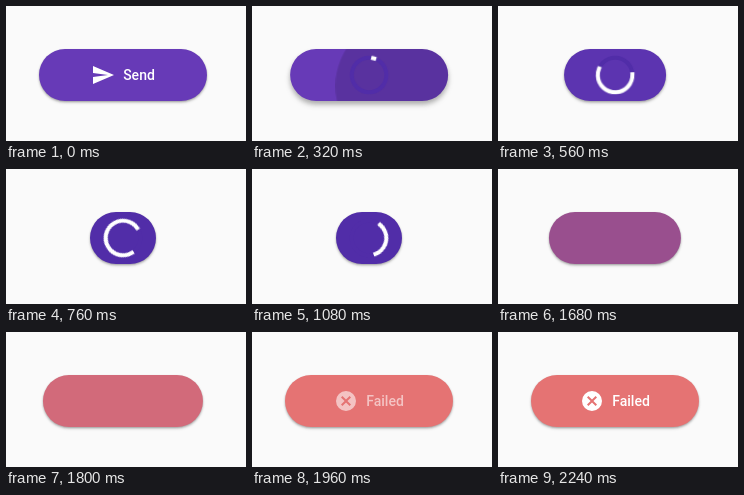
These frames come from a looping animation (240 by 135 pixels, 3.2 s). An HTML page:

```html
<!DOCTYPE html>
<html lang="en">
<head>
<meta charset="utf-8">
<title>Send button</title>
<style>
  :root {
    --idle: #673ab7;
    --busy: #512da8;
    --fail: #e57373;
    --rest: 0 1px 2px rgba(0,0,0,.24), 0 2px 3px rgba(0,0,0,.14);
    --lift: 0 3px 4px rgba(0,0,0,.2), 0 4px 6px rgba(0,0,0,.14);
  }
  html, body { margin: 0; width: 100%; height: 100%; overflow: hidden; background: #fafafa; }
  body * { animation: 3200ms linear infinite; }

  .button {
    position: absolute; left: 117px; top: 42.5px; height: 52.5px; width: 168px;
    transform: translateX(-50%);
    border-radius: 27px; overflow: hidden;
    background: var(--idle); box-shadow: var(--rest);
    animation-name: width, tint, lift;
  }
  .ripple {
    position: absolute; left: calc(50% + 35px); top: 37px;
    width: 136px; height: 136px; margin: -68px;
    border-radius: 50%; background: rgba(0,0,0,.13);
    animation-name: ripple;
  }
  .label {
    position: absolute; left: 50%; top: 0; height: 100%; width: 168px; margin-left: -84px;
    display: flex; align-items: center; justify-content: center; gap: 8px;
    color: #fff; font: 500 14px/1 Roboto, sans-serif; white-space: nowrap;
  }
  .label svg { width: 24px; height: 24px; fill: currentColor; }
  .send { animation-name: send; animation-timing-function: step-end; }
  .failed { animation-name: failed; }

  .spinner {
    position: absolute; left: 50%; top: 50%; width: 44px; height: 44px; margin: -22px;
    fill: none; stroke-width: 4;
    animation-name: busy; animation-timing-function: step-end;
  }
  .track { stroke: var(--busy); }
  .arc { stroke: #fff; stroke-linecap: square; animation-name: sweep; }
  .spin { animation-name: spin; }

  @keyframes width {
    0%, 8.656% { width: 168px; }
    22.344%, 43.656% { width: 66px; }
    57.344%, 100% { width: 168px; }
  }
  @keyframes tint {
    0% { background-color: var(--idle); }
    8.656% { background-color: var(--idle); animation-timing-function: ease-in; }
    22.344% { background-color: var(--busy); }
    43.656% { background-color: var(--busy); animation-timing-function: ease-in; }
    57.344%, 100% { background-color: var(--fail); }
  }
  @keyframes lift {
    0%, 7% { box-shadow: var(--rest); }
    10%, 12.5% { box-shadow: var(--lift); }
    18%, 100% { box-shadow: var(--rest); }
  }
  @keyframes ripple {
    0%, 7% { transform: scale(0); opacity: 1; }
    10% { transform: scale(1); opacity: 1; }
    12.5% { transform: scale(1.9); opacity: 1; }
    17.5%, 100% { transform: scale(1.9); opacity: 0; }
  }
  @keyframes send {
    0% { opacity: 1; }
    8.656%, 100% { opacity: 0; }
  }
  @keyframes failed {
    0%, 57.344% { opacity: 0; }
    64.19%, 100% { opacity: 1; }
  }
  @keyframes busy {
    0% { opacity: 0; }
    8.656% { opacity: 1; }
    43.656%, 100% { opacity: 0; }
  }
  /* The head runs ahead for half a turn, then the tail catches up. */
  @keyframes sweep {
    0% { stroke-dasharray: .1 360; stroke-dashoffset: 0; }
    8.656% { stroke-dasharray: .1 360; stroke-dashoffset: 0; animation-timing-function: cubic-bezier(.4,0,.2,1); }
    26.906% { stroke-dasharray: 270 360; stroke-dashoffset: 0; animation-timing-function: cubic-bezier(.4,0,.2,1); }
    45.156%, 100% { stroke-dasharray: .1 360; stroke-dashoffset: -270; }
  }
  @keyframes spin {
    0%, 8.656% { transform: rotate(-90deg); }
    45.156%, 100% { transform: rotate(270deg); }
  }
</style>
</head>
<body>
  <div class="button">
    <div class="ripple"></div>
    <div class="label send">
      <svg viewBox="0 0 24 24"><path d="M2 21L23 12 2 3V10L17 12 2 14Z"/></svg>
      <span>Send</span>
    </div>
    <svg class="spinner" viewBox="-22 -22 44 44">
      <circle class="track" r="17.3"/>
      <g class="spin"><circle class="arc" r="17.3" pathLength="360"/></g>
    </svg>
    <div class="label failed">
      <svg viewBox="0 0 24 24"><path fill-rule="evenodd" d="M12 2a10 10 0 1 0 0 20 10 10 0 0 0 0-20ZM17 15.6 15.6 17 12 13.4 8.4 17 7 15.6 10.6 12 7 8.4 8.4 7 12 10.6 15.6 7 17 8.4 13.4 12Z"/></svg>
      <span>Failed</span>
    </div>
  </div>
</body>
</html>
```
